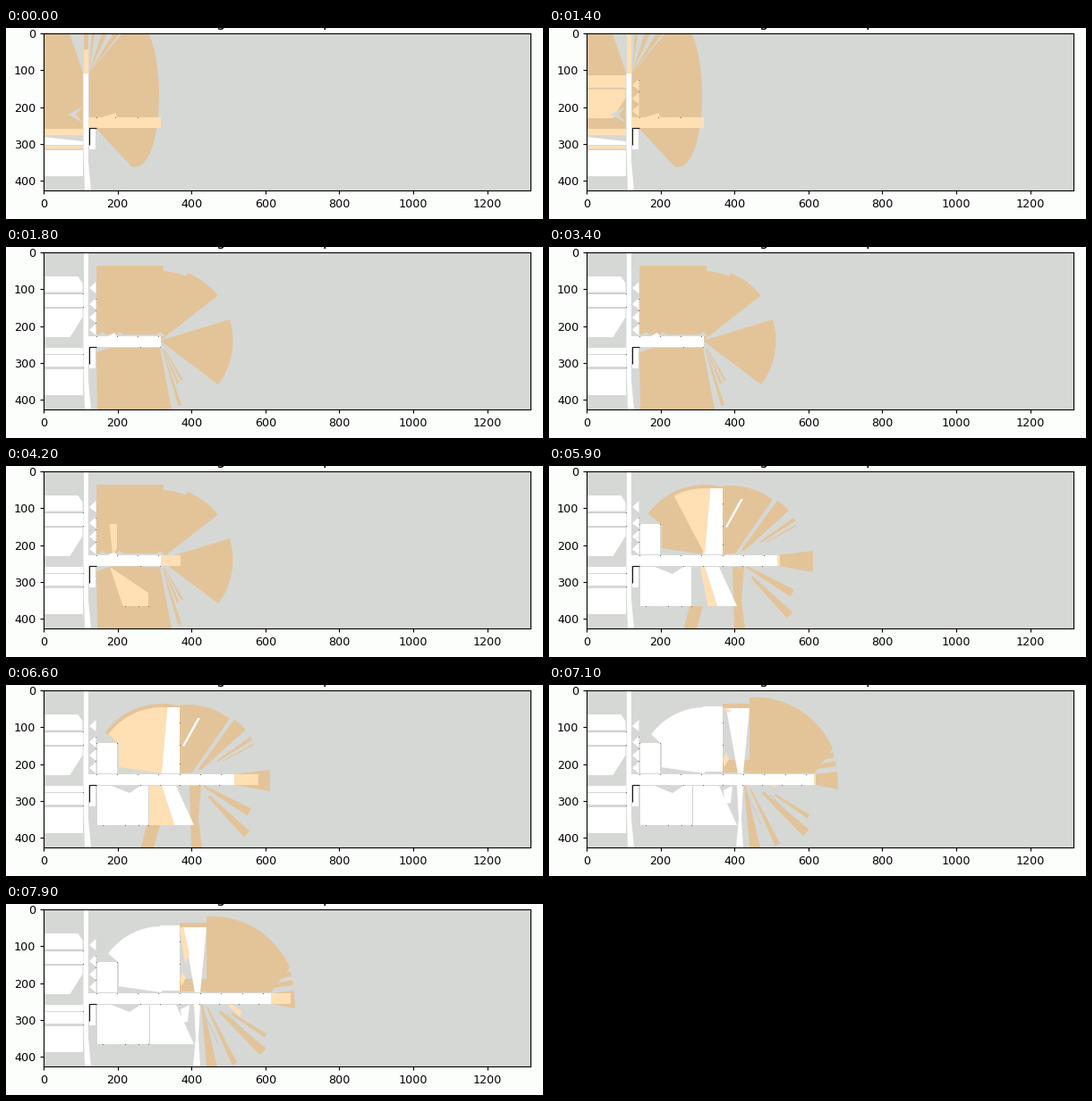
A matplotlib script that plays this animation: 600x214 px, repeating every 8000 ms.

```python
import numpy as np
import matplotlib.pyplot as plt
from matplotlib.animation import FuncAnimation
from matplotlib.patches import Polygon
from matplotlib.transforms import Affine2D

W, H, DPI = 600, 214, 100
FRAMES, STEP = 80, 100
GRAY, DARK, LIGHT, WHITE = "#d6d8d5", "#e3c499", "#ffdfb4", "#ffffff"
PAPER, WALL, DOT = "#fcfefc", "#c6c8c4", "#6c6b68"
LEFT, TOP, RIGHT, BOTTOM = 42, 6, 586, 182
CELL = 2.421  # map cells per screen pixel

# times at which the predicted area is renewed
T_ROOMS, T_HALL, T_DOME, T_END = 1600, 5800, 7000, 7900

# the main corridor and the rooms off the left passage, in screen pixels
HALL_TOP, HALL_LOW = 100, 111.5
ROOM_EDGE = 85.5

plt.rcParams["font.family"] = "DejaVu Sans"
fig = plt.figure(figsize=(W / DPI, H / DPI), dpi=DPI, facecolor=PAPER)
ax = fig.add_axes([LEFT / W, 1 - BOTTOM / H, (RIGHT - LEFT) / W, (BOTTOM - TOP) / H],
                  facecolor=GRAY)
ax.set_xlim(0, (RIGHT - LEFT) * CELL)
ax.set_ylim((BOTTOM - TOP) * CELL, 0)
ax.set_xticks(range(0, 1201, 200))
ax.set_yticks(range(0, 401, 100))
ax.tick_params(labelsize=9.2, length=3.2, pad=3)
screen = Affine2D().translate(-LEFT, -TOP).scale(CELL) + ax.transData

# only the descenders of the title reach into view
for x, letter in ((239, "g"), (359, "p")):
    fig.text(x / W, 1 + 2.4 / H, letter, fontsize=12, ha="center", va="baseline")


# ---- shapes ----

def rect(x0, y0, x1, y1):
    return [(x0, y0), (x1, y0), (x1, y1), (x0, y1)]


def corridor(x0, x1):
    return rect(x0, HALL_TOP, x1, HALL_LOW)


def arc(center, a0, a1, radius):
    """Points around a center; degrees run anticlockwise from the right."""
    deg = np.linspace(a0, a1, 60)
    r = radius(deg) if callable(radius) else radius
    rad = np.radians(deg)
    return list(zip(center[0] + r * np.cos(rad), center[1] - r * np.sin(rad)))


def sector(center, a0, a1, r1, r0=0):
    return arc(center, a0, a1, r1) + arc(center, a1, a0, r0)


def ray(center, angle, half, r0, r1):
    return sector(center, angle - half, angle + half, r1, r0)


def view(door, a0, a1, box):
    """What is seen of a box through a door between two angles."""
    x0, y0, x1, y1 = box

    def reach(deg):
        c, s = np.cos(np.radians(deg)) + 1e-9, np.sin(np.radians(deg)) + 1e-9
        across = np.where(c > 0, x1 - door[0], x0 - door[0]) / c
        along = np.where(s > 0, door[1] - y0, door[1] - y1) / s
        return np.minimum(across, along)

    return [door] + arc(door, a0, a1, reach)


def room(y0, y1, cut_top=0, cut_low=0):
    """A room left of the passage, its right corners cut off."""
    e = ROOM_EDGE
    return [(LEFT, y0), (e - cut_top, y0), (e, y0 + 1.5 * cut_top),
            (e, y1 - 1.6 * cut_low), (e - cut_low, y1), (LEFT, y1)]


def dome(radius, a0, a1):
    """Part of the round room; past 145 degrees the office wall limits it."""
    def reach(deg):
        return np.where(deg > 145, 48 / np.abs(np.cos(np.radians(deg))), radius)
    center = (174, 99)
    return [center] + arc(center, a0, a1, reach)


def below(points, y):
    """Cut an outline so that only the part under y stays."""
    pts = np.array(points, float)
    pts[:, 1] = np.maximum(pts[:, 1], y)
    return pts


def ramp(t, start, end):
    return float(np.clip((t - start) / (end - start), 0, 1))


# ---- drawing ----

def fill(color, *shapes):
    for pts in shapes:
        ax.add_patch(Polygon(pts, fc=color, ec="none", lw=0, transform=screen, zorder=2))


def stroke(color, width, *lines):
    for pts in lines:
        ax.add_patch(Polygon(pts, closed=False, fc="none", ec=color,
                             lw=width * 72 / DPI, transform=screen, zorder=2))


def dots(xs, ys):
    for x, y in np.broadcast(xs, ys):
        fill(DOT, rect(x - .5, y - .5, x + .5, y + .5))


def wall_dots(end):
    dots(np.arange(101, end, 23.3), HALL_TOP)
    dots(np.arange(150, end, 22), HALL_LOW + .5)


# ---- floor plan ----

PASSAGE_X = 86.5, 92
PASSAGE = [(PASSAGE_X[0], 51), (92, 51), (92, 150), (95, BOTTOM), (88, BOTTOM),
           (PASSAGE_X[0], 130)]
CORNER = rect(93, 113, 100, 136)
UPPER_ROOMS = [room(33, 50.5, cut_top=5), room(52.5, 67), room(68.5, 101, cut_low=14)]
BAND, STORE = room(113, 119.5), room(137, 165.5)
NICHES = [[(93, y), (100.5, y - 7), (100.5, y + 6)] for y in (46, 64, 79, 93)]
OFFICE = (101.5, 65, 124, 99)
HALL = (101.5, 113, 159, 157)
DOME_SPAN = 85, 172


def free_rooms():
    fill(WHITE, PASSAGE, rect(PASSAGE_X[0], TOP, 92, 52), CORNER, BAND, STORE,
         room(121, 133.5), *UPPER_ROOMS, *NICHES)
    stroke(WALL, .8, *[[(LEFT, y), (ROOM_EDGE, y)] for y in (51.5, 67.7)])
    dots(86, (52, 67, 120, 135))
    dots(100.5, (58, 71, 85))


def free_hall():
    free_rooms()
    fill(WHITE, rect(*OFFICE), rect(*HALL))
    fill(GRAY, [(118, 113), (150, 113), (138, 121)])
    dots((101, 124), 65)
    dots((108, 133, 148, 159), 157)


# ---- stages of the exploration ----

def scene_rooms(t):
    k = ramp(t, 0, 900)
    theta = np.radians(np.linspace(-58, 90, 50))
    lobe = list(zip(141 + 30 * np.cos(theta) ** .8, 75 + 81 * np.sin(theta)))
    fill(DARK, lobe + [(101, 113), (93, 101), (93, 50), (130, TOP)],
         [(LEFT, TOP), (71, TOP), (86, 50), (86, 113), (LEFT, 113)],
         rect(PASSAGE_X[0], TOP, 92, 52))
    for x, width in ((96, 3), (107, 6), (120, 7)):
        fill(DARK, [(93, 50), (x, TOP), (x + width, TOP)])
    fill(GRAY, rect(LEFT, 119.5, 86, 137))
    fill(WHITE, PASSAGE, CORNER, STORE, [(LEFT, 122), (86, 127), (86, 131), (LEFT, 131)])
    fill(LIGHT, corridor(92, 173), BAND, rect(LEFT, 131.5, 86, 135),
         rect(PASSAGE_X[0], 24 - 18 * k, 92, 51), [(104, 101), (123, 95), (124, 101)])
    # rooms come into view from the bottom up
    front = 101 - 49 * k - 20 * ramp(t, 1400, 1500)
    fill(LIGHT, *[below(r, front) for r in UPPER_ROOMS + NICHES])
    if k == 1:
        stroke(GRAY, 1, [(LEFT, 67.7), (ROOM_EDGE, 67.7)])
        dots(100.5, (58, 71))
    fill(GRAY, [(69, 97), (86, 88), (78, 97), (86, 106)])
    dots((101, 122, 147), HALL_TOP)


def scene_fans(t):
    hub = (172, 105)
    fill(DARK, rect(101, 20.5, 176, 98), sector(hub, 38, 68, 82), sector(hub, 60, 88, 78),
         sector(hub, -37, 17, 81.5),
         [(101, 118), (116, 113), (172, 113), (179, 150), (185, BOTTOM), (102, BOTTOM)])
    fill(DARK, *[ray(hub, a, 1.5, 10, r) for a, r in ((-61, 51), (-67, 52), (-73, 76))])
    fill(GRAY, *[[(x - 6, 100), (x, 95), (x + 6, 100)] for x in (108, 127, 172)])
    free_rooms()
    fill(WHITE, corridor(92, 173), [(114, 100), (121, 96), (124, 100)])
    k = ramp(t, 3600, 5200)
    if k > 0:
        fill(LIGHT, corridor(173, 173 + 82 * ramp(t, 3600, T_HALL)),
             view((119, 99), 82 - 81 * k, 82 + 97 * k * k, OFFICE),
             view((116, 113), -54 + 53 * k, -54 - 125 * k * k, HALL))
        fill(DARK, [(118, 112.5), (153, 112.5), (138, 126)])
        dots((133, 148, 159), 157)
    if t >= 4800:
        fill(WHITE, [(173, 100), (193, 93.5), (181, 100)])
    rise = 74 * ramp(t, 5400, T_HALL)
    fill(LIGHT, [(171, 99), (180, 99 - rise), (194, 99 - rise), (194, 99)])
    wall_dots(173)


def scene_dome(t):
    hub = (207, 105)
    fill(DARK, dome(78, 75, 172), arc((203, 100), 53, 97, 78) + [(194, 99), (208, 98)],
         [(254, 100), (295, 95), (295, 119), (254, 111.5)],
         [(157, 157), (172, 157), (165, BOTTOM), (151, BOTTOM)],
         [(205, 113), (218, 113), (215, 150), (219, BOTTOM), (207, BOTTOM)])
    for angle, half, r0, r1 in ((48, 6, 14, 82), (34, 1.5, 35, 81), (29, .6, 40, 79),
                                (-30, 3.5, 16, 75), (-45, 3, 28, 88)):
        fill(DARK, ray(hub, angle, half, r0, r1))
    free_hall()
    fill(WHITE, corridor(92, 255), [(180, 25), (194, 25), (194, 99), (172, 99)],
         [(174, 113), (190, 113), (210, 157), (188, 157)],
         [(197, 68), (214, 37), (217, 37), (199, 69)])
    k = ramp(t, T_HALL - 200, 6400)
    a0, a1 = DOME_SPAN
    fill(LIGHT, corridor(255, 255 + 41 * ramp(t, T_HALL, T_DOME)),
         dome(74, a0, a0 + (a1 - a0) * k),
         [(174 - 14 * k, 113), (174, 113), (188, 157), (188 - 28 * k, 157)])
    grow = ramp(t, 6600, T_DOME)
    if grow > 0:
        fill(LIGHT, [(211, 99), (211 - 14 * grow, 99 - 74 * grow),
                     (211 + 12 * grow, 99 - 74 * grow), (217, 99)],
             rect(210, 113, 217, 113 + 69 * grow))
    wall_dots(255)
    dots(194, (42, 67, 88))


def scene_far(t):
    k = ramp(t, T_DOME, T_END)
    hub = (224, 105)
    fill(DARK, arc(hub, 20, 90, lambda a: 99 - 8 * (a - 20) / 70) + [(224, 99), (296, 99)],
         rect(194, 21, 224, 27), rect(194, 84, 226, 98),
         [(296, 100), (322, 97), (323, 117), (296, 111.5)])
    fill(DARK, *[ray(hub, a, 1.7, 60, 98) for a in (16, 10)])
    for angle, half, r0, r1 in ((-81, 4, 13, 84), (-64, 2, 18, 88),
                                (-43, 3, 30, 96), (-33, 1.5, 42, 87)):
        fill(DARK, ray((217, 100), angle, half, r0, r1))
    stroke(WALL, .8, [(221, 122), (237, 156)], [(247, 123), (281, 158)])
    free_hall()
    fill(WHITE, corridor(92, 296), dome(74, *DOME_SPAN), rect(172, 24, 194, 97),
         [(159, 113), (190, 113), (210, 157), (159, 157)],
         [(195, 118), (205, 113), (203, 132), (197, 133)],
         [(198, 26), (224, 26), (217, 99), (211, 99)],
         [(210, 112), (217, 112), (215, 150), (217, BOTTOM), (209, BOTTOM), (212, 150)])
    stroke(WALL, .8, [(159.5, 113), (159.5, 157)])
    fill(LIGHT, corridor(296, 296 + 22 * k),
         [(247, 113), (254, 113), (252 + 12 * k, 113 + 8 * k), (252 + 9 * k, 113 + 13 * k)],
         [(194, 26), (198, 26), (205, 26 + 30 * k), (200, 26 + 42 * k)],
         [(194, 83), (198, 76), (201, 83), (196, 92)])
    wall_dots(296)
    dots(194, (42, 67))


def draw(i):
    t = i * STEP
    for patch in list(ax.patches):
        patch.remove()
    if t < T_ROOMS:
        scene_rooms(t)
    elif t < T_HALL:
        scene_fans(t)
    elif t < T_DOME:
        scene_dome(t)
    else:
        scene_far(t)
    stroke("#1c1c1a", 1.2, [(101, 112.3), (92.6, 112.3), (92.6, 131)])
    return ax.patches


anim = FuncAnimation(fig, draw, frames=FRAMES, interval=STEP, repeat=True,
                     repeat_delay=0, init_func=lambda: [], blit=False)
plt.show()
```
